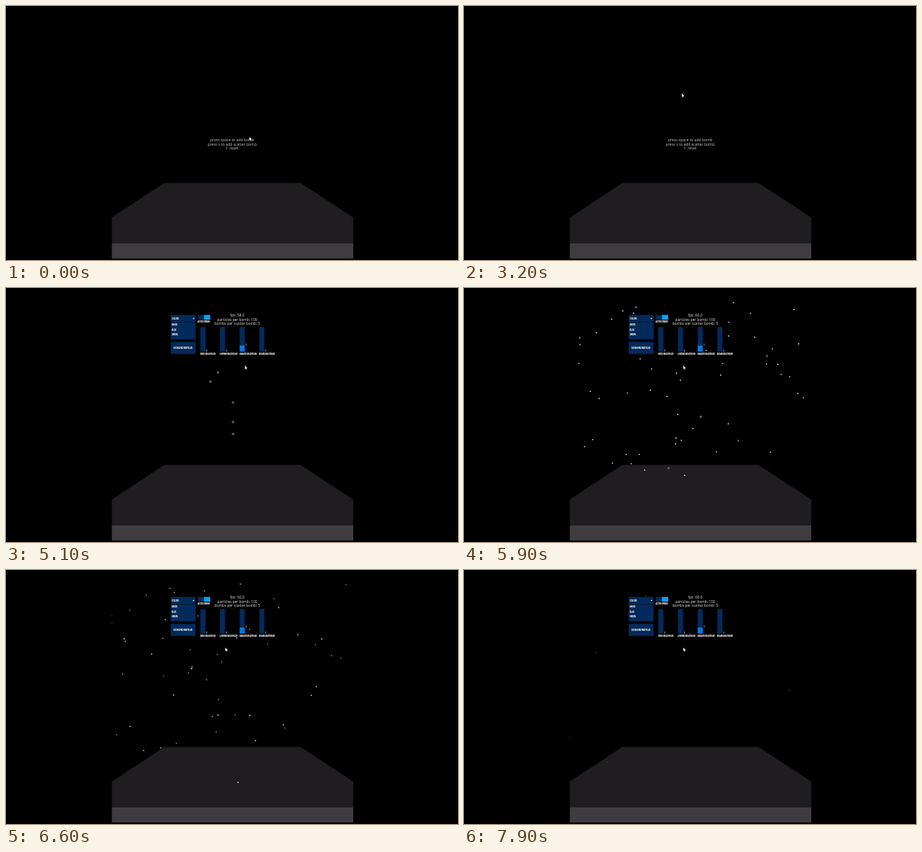
An HTML page with a canvas that plays this animation: 600 px wide and 338 px high, repeating every 8 s.

```html
<!DOCTYPE html>
<html lang="en">
<head>
<meta charset="utf-8">
<title>Bomb particles</title>
<style>
  html, body { margin: 0; width: 600px; height: 338px; overflow: hidden; background: #000; }
  svg, canvas { position: absolute; left: 0; top: 0; display: block; }
  text { font-family: "Open Sans", "Noto Sans", sans-serif; text-anchor: middle; }
  #help { font-size: 5px; fill: #c4c4c4; }
  #hud { font-size: 4.8px; fill: #e2e2e2; }
  .panel { fill: #032a5a; }
  #labels text { font-size: 2.8px; letter-spacing: -.33px; font-weight: 700; fill: #fff; text-anchor: start; }
</style>
</head>
<body>
<svg width="600" height="338">
  <path fill="#1f1d1f" d="M210 235.5H391L461 281.5V316H140.5V281.5Z"/>
  <path fill="#3e3c3f" d="M140.5 316H461V336H140.5Z"/>
</svg>
<canvas id="sky" width="600" height="338"></canvas>
<svg width="600" height="338">
  <g id="help">
    <text x="300.3" y="180">press space to add bomb</text>
    <text x="300.3" y="185.8">press s to add scatter bomb</text>
    <text x="300.3" y="191.4">r: reset</text>
  </g>
  <g id="ui">
    <g class="panel">
      <rect x="218.6" y="35.8" width="33" height="9.5"/>
      <rect x="218.6" y="45.6" width="33" height="22.8"/>
      <rect x="218.6" y="71.7" width="33" height="16"/>
      <rect x="254.6" y="35.8" width="8.2" height="6.4"/>
    </g>
    <rect x="262.8" y="35.8" width="8.2" height="6.4" fill="#08a2f6"/>
    <path d="M247.6 39.9h2.6l-1.3 1.5z" fill="#fff"/>
    <g id="labels">
      <text x="220" y="41.6">COLORS</text>
      <text x="220" y="50">WHITE</text>
      <text x="220" y="56.6">BLUE</text>
      <text x="220" y="63.2">GREEN</text>
      <text x="222.2" y="80.9">NO BOUND PARTICLES</text>
      <text x="254.2" y="46">ACTIVE SPAWN</text>
    </g>
    <g id="hud">
      <text id="fps" x="307" y="38.4"></text>
      <text x="307" y="44">particles per bomb: 100</text>
      <text x="307" y="49.4">bombs per scatter bomb: 5</text>
    </g>
  </g>
  <path id="cursor" d="M0 0V5.2L1.2 4.2 2 6 2.9 5.6 2.1 3.9 3.7 3.8Z" fill="#fff" stroke="#000" stroke-width=".25"/>
</svg>
<script>
const LOOP = 8000, STEP = 100, FALL = 109, FLOOR = 262, GLIDE = 3300;
const $ = id => document.getElementById(id);
const g = $('sky').getContext('2d');

// Vertical sliders
const add = (tag, attrs, text = '') => {
  const el = document.createElementNS('http://www.w3.org/2000/svg', tag);
  for (const key in attrs) el.setAttribute(key, attrs[key]);
  el.textContent = text;
  $('labels').append(el);
};
['SPEED', 'LIFETIME', 'GRAVITY', 'BOMB'].forEach((name, i) => {
  const x = 258 + 26.1 * i, active = name === 'GRAVITY';
  add('rect', { x, y: 52, width: 6.6, height: 32.5, class: 'panel' });
  if (active) add('rect', { x, y: 76.5, width: 6.6, height: 8, fill: '#0a76dc' });
  add('text', { x: x + 7.7, y: active ? 76.6 : 84.8 }, '1');
  add('text', { x: x - .5, y: 88.5 }, name + ' MULTIPLIER');
});

// Cursor stops (ms, x, y): it jumps between them at first and glides after GLIDE
const stops = [
  [0, 323, 174], [500, 332, 74], [1400, 277, 120], [2300, 288, 120], [3200, 289, 116],
  [GLIDE, 289, 116], [3900, 301, 117], [4540, 301, 117], [4840, 271, 117],
  [5000, 281, 111], [5100, 317, 103], [5110, 314, 103], [5500, 291, 103], [LOOP, 291, 103]
];
function cursorAt(ms) {
  const i = stops.findIndex(stop => stop[0] > ms);
  const [t, x, y] = stops[i - 1], [t2, x2, y2] = stops[i];
  const k = ms < GLIDE ? 0 : (ms - t) / (t2 - t);
  return [x + (x2 - x) * k, y + (y2 - y) * k];
}

// Each bomb falls from where the cursor is
const bombs = [4260, 4352, 4533, 4840, 5000, 5110].map(ms => {
  const [x, y] = cursorAt(ms), start = ms / 1000;
  return { x, y, start, hit: start + Math.sqrt((FLOOR - y) / FALL) };
});

let seed = 41;
const rnd = () => {
  seed = (seed * 1664525 + 1013904223) >>> 0;
  return seed / 4294967296;
};

// Sparks that stay in view; fewer from the later bombs
const sparks = bombs.flatMap((bomb, i) => Array.from({ length: i < 3 ? 20 : 11 }, () => ({
  bomb,
  x: 146 + 310 * rnd() ** 1.1,
  y: rnd() < .04 ? 250 + 55 * rnd() : 14 + 234 * rnd(),
  life: .2 + 1.8 * rnd()
})));

function dot(x, y, r, fill, alpha = 1) {
  g.globalAlpha = alpha;
  g.fillStyle = fill;
  g.beginPath();
  g.arc(x, y, r, 0, 7);
  g.fill();
}

function drawSpark({ bomb, x, y, life }, t) {
  const age = t - bomb.hit;
  if (age < 0 || age >= life) return;
  // fast damped burst, then a slow outward drift
  const burst = 1 - Math.exp(-age / .035), drift = 1 + .13 * (age - .6);
  const toX = 300 + (x - 300) * drift, toY = 125 + (y - 125) * drift;
  const fade = Math.min(1, 1.2 - .5 * age);
  dot(bomb.x + (toX - bomb.x) * burst, FLOOR + (toY - FLOOR) * burst, .6 + .22 * fade, '#fff', fade);
}

function draw(now) {
  const ms = Math.floor(now % LOOP / STEP) * STEP, t = ms / 1000;
  const playing = ms >= 4300;
  $('help').style.display = playing ? 'none' : '';
  $('ui').style.display = playing ? '' : 'none';
  $('fps').textContent = 'fps: ' + (ms < 5200 ? '58.0' : ms >= 6200 && ms < 6500 ? '59.0' : '60.0');
  $('cursor').setAttribute('transform', `translate(${cursorAt(ms)})`);

  g.clearRect(0, 0, 600, 338);
  g.save();
  g.beginPath();
  g.rect(140.5, 0, 320.5, 338);
  g.clip();
  for (const { x, y, start, hit } of bombs)
    if (t >= start && t < hit) dot(x + .4, y + FALL * (t - start) ** 2 + .3, 1.7, '#5a5a5a');
  for (const spark of sparks) drawSpark(spark, t);
  g.restore();
}

const began = performance.now();
function tick() {
  draw(performance.now() - began);
  requestAnimationFrame(tick);
}
tick();
</script>
</body>
</html>
```
